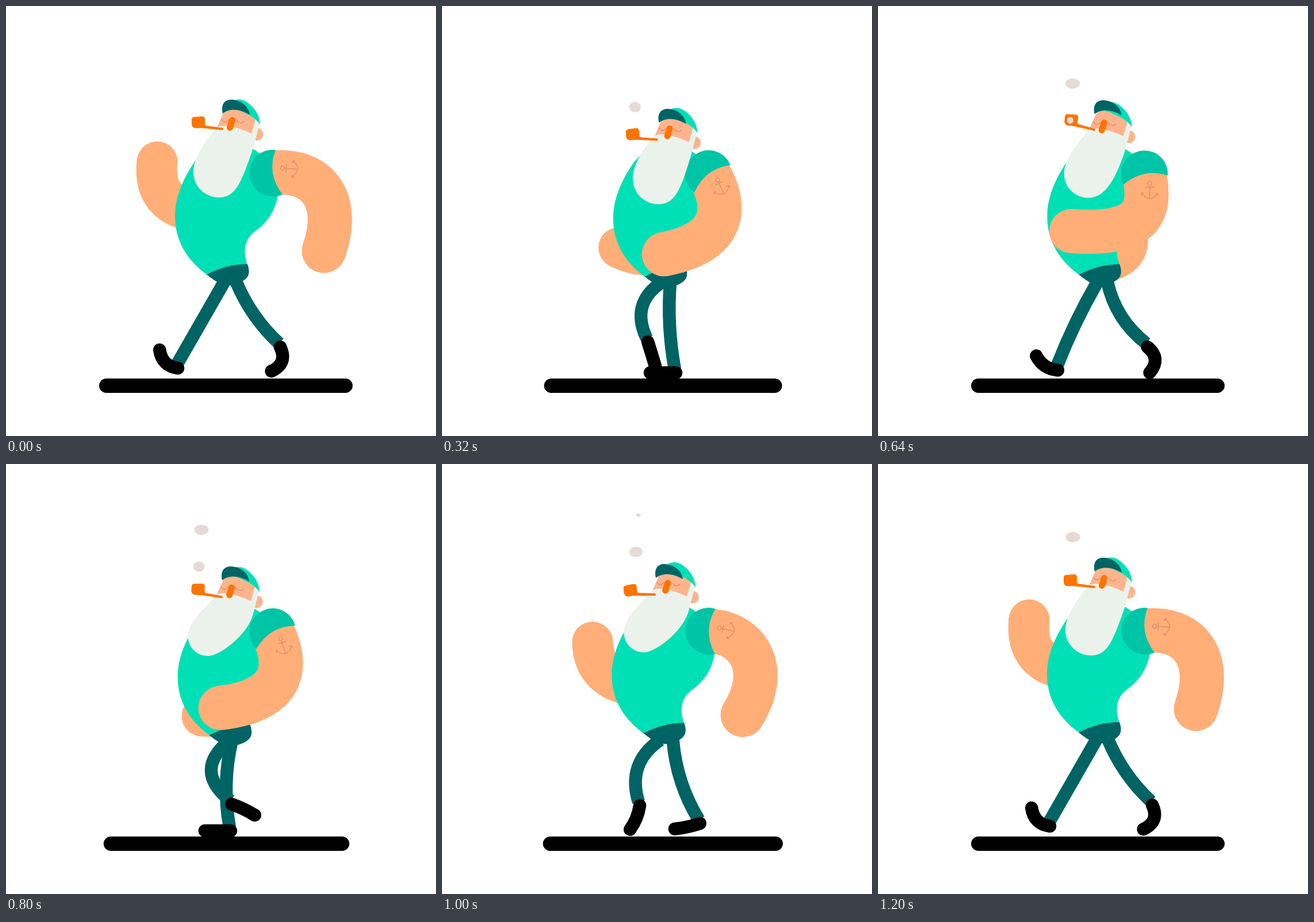
Recreate the animation shown at these times as an HTML page with a canvas. Size 748 by 748 pixels, loop 1.24 s.

```html
<!DOCTYPE html>
<html lang="en">
<head>
<meta charset="utf-8">
<title>Walking sailor</title>
<style>
  html, body { margin: 0; width: 100%; height: 100%; overflow: hidden; background: #fff; }
  canvas { display: block; width: 748px; height: 748px; }
</style>
</head>
<body>
<canvas id="stage" width="748" height="748"></canvas>
<script>
const ctx = document.getElementById('stage').getContext('2d');
const { sin, cos, abs, min, max, floor, hypot, PI } = Math;
const LOOP = 1240, WALK = 1200, STEP = 40;
const SKIN = '#ffae78', FACE = '#fdb48d', SHIRT = '#00e0b6', SLEEVE = '#00c4a6',
      DARK = '#006464', WHITE = '#ebf2eb', ORANGE = '#ff7300', INK = '#d88f6c', SMOKE = '#e5dad8';

const wrap = t => (t + WALK) % WALK;
const rad = deg => deg * PI / 180;

// One walk cycle of a foot: time, heel x, heel y, foot angle, knee bend.
const GAIT = [
  [0, 299, 630, 225, 0],
  [160, 368, 638, 180, 25],
  [320, 407, 638, 180, 10],
  [480, 456, 621, 163, 18],
  [600, 477, 593, 110, 14],
  [760, 406, 593, 20, 70],
  [920, 358, 584, 73, 44],
  [1000, 344, 594, 112, 42],
  [1080, 313, 619, 206, 9]
];

// Arm poses swung back, halfway and forward: start, two controls, hand.
const NEAR_ARM = [
  [463, 290, 536, 282, 586, 332, 553, 426],
  [463, 291, 490, 340, 500, 410, 379, 428],
  [463, 292, 475, 355, 465, 400, 335, 390]
];
const FAR_ARM = [
  [340, 356, 282, 356, 257, 322, 263, 271],
  [385, 425, 360, 438, 335, 434, 307, 420],
  [425, 365, 448, 420, 432, 440, 386, 447]
];

// Smooth periodic curve through the gait rows, without overshoot.
function gait(t) {
  const n = GAIT.length;
  const row = i => GAIT[(i + n) % n];
  const time = i => row(i)[0] + floor(i / n) * WALK;
  const slope = (i, k) => (row(i + 1)[k] - row(i)[k]) / (time(i + 1) - time(i));
  const tangent = (i, k) => {
    const a = slope(i - 1, k), b = slope(i, k);
    return a * b <= 0 ? 0 : 2 * a * b / (a + b);
  };
  let i = n - 1;
  while (GAIT[i][0] > t) i--;
  const h = time(i + 1) - time(i), u = (t - time(i)) / h, v = 1 - u;
  return [1, 2, 3, 4].map(k =>
    row(i)[k] * v * v * (1 + 2 * u) + row(i + 1)[k] * u * u * (3 - 2 * u)
    + h * u * v * (tangent(i, k) * v - tangent(i + 1, k) * u));
}

// Arm swing from 0 (back) to 1 (forward at the peak time).
function swing(t, peak) {
  const u = t < peak ? t / peak : (WALK - t) / (WALK - peak);
  const a = u ** 2.6;
  return a / (a + (1 - u) ** 2.6);
}

// Parabola through three poses at 0, mid and 1.
function blend([a, b, c], mid, w) {
  const ka = (w - mid) * (w - 1) / mid;
  const kb = w * (1 - w) / (mid * (1 - mid));
  const kc = w * (w - mid) / (1 - mid);
  return a.map((v, i) => v * ka + b[i] * kb + c[i] * kc);
}

// Dip after each of the two steps, 0 to 1.
const dip = t => max(0, sin(PI * (wrap(t) % 600) / 480));

function fill(d, color) {
  ctx.fillStyle = color;
  ctx.fill(new Path2D(d));
}
function line(d, color, width, cap = 'round') {
  ctx.strokeStyle = color;
  ctx.lineWidth = width;
  ctx.lineCap = cap;
  ctx.stroke(new Path2D(d));
}
function ellipse(x, y, rx, ry, color) {
  ctx.fillStyle = color;
  ctx.beginPath();
  ctx.ellipse(x, y, rx, ry, 0, 0, 2 * PI);
  ctx.fill();
}
function at(x, y, angle, draw) {
  ctx.save();
  ctx.translate(x, y);
  ctx.rotate(rad(angle));
  draw();
  ctx.restore();
}
// Quadratic curve whose control lies off the chord's middle.
function bow(x, y, x2, y2, bulge) {
  const dx = x2 - x, dy = y2 - y, k = bulge / hypot(dx, dy);
  return `M${x},${y} Q${(x + x2) / 2 + dy * k},${(y + y2) / 2 - dx * k} ${x2},${y2}`;
}

function drawGround(t) {
  const grow = 1 - abs(1 - t % 640 / 320);
  line(`M${174.5 + 15.5 * grow},660.5 H${590.5 - 11.5 * grow}`, '#000', 25);
}

function drawLeg(p) {
  const [x, y, angle, bend] = gait(p);
  const turn = 2 * PI * p / WALK, a = rad(angle);
  const hip = 390 + 12 * sin(turn - PI / 3);
  const curl = 24 * cos(turn) ** 2 * abs(sin(a));
  line(bow(hip, 480, x - 2, y - 6, -bend), DARK, 22.5, 'butt');
  line(bow(x, y, x + 45 * cos(a), y + 45 * sin(a), curl), '#000', 22.5);
}

function drawArm(p, width) {
  line(`M${p[0]},${p[1]} C${p.slice(2)}`, SKIN, width, 'butt');
  ellipse(p[6], p[7], width / 2, width / 2, SKIN);
}

function drawTorso() {
  fill('M349,467 C312,440 294,405 294,366 C294,325 315,290 330,268 L380,215 L427,247 ' +
    'C455,262 475,290 474,322 C470,360 450,380 432,393 C414,407 412,428 420,450 Q383,449 349,467Z', SHIRT);
  fill('M349,467 Q383,449 420,449 C426,466 421,474 409,480 Q390,489 375,484 Q362,478 349,467Z', DARK);
}

function drawSleeve() {
  fill('M6,-40.6 Q-10,0 18,37 A41,41 0 0 1 -39.5,0 A40,40 0 0 1 6,-40.6Z', SLEEVE);
  line('M21.5,-9 a3.5,3.5 0 1 1 -7,0 a3.5,3.5 0 1 1 7,0 L45,-7 M25,-15 L24,-2 ' +
    'M36,-21.5 Q54,-8 34,6.5 M35,-18 L36,-21.5 L40,-22 M34,3 L34,6.5 L38,7', INK, 1.3);
}

function drawBeard(hx, hy, lead, back) {
  const r = 44 - 11 * back, cx = 370 + 6 * lead - 22 * back, cy = 289 + .8 * hy - 3 * back;
  const bottom = cy + r, left = cx - r;
  const qx = 408 + 6 * lead + 14 * back, qy = 312 + .8 * hy - 34 * back;
  const p = (x, y) => `${x + hx},${y + hy}`;
  fill(`M${p(434, 197)} L${p(441, 205)} L${p(430, 247)} ` +
    `C${qx},${qy} ${cx + .64 * r},${bottom} ${cx},${bottom} ` +
    `C${cx - .5 * r},${bottom} ${left},${cy + .6 * r} ${left},${cy} ` +
    `C${left},${cy - 26} ${p(348, 234)} ${p(366, 212)} ` +
    `Q${p(370, 208)} ${p(380, 208.5)} Q${p(403, 210)} ${p(427, 222)}Z`, WHITE);
}

function drawHead(t) {
  const sway = sin(2 * PI * t / WALK), lead = max(0, sway), back = max(0, -sway);
  const hy = 17 * dip(t), lag = 17 * dip(t - 30);
  const hx = 3 * lead * dip(t) - back;
  const brim = hx + 1.5 * min(0, hy - lag);

  at(hx, hy, 0, () => {
    ellipse(436.5, 223, 11, 11, FACE);
    fill('M379,184 L366,214 L428,226 L436,198 L420,176 L388,174Z', FACE);
  });
  drawBeard(hx, hy, lead, back);
  at(hx, hy, 0, () => {
    line('M375,197 Q380,206 387,198 M402,199 Q407,207 414,201', INK, 1.4);
    line('M393.5,198.5 L389.5,211.5', ORANGE, 11);
    fill('M385,175 C395,158 412,160 424,171 C436,182 441,192 442,206 L434,197 L424,190 L405,181Z', SHIRT);
  });
  at(brim, lag, 0, () =>
    fill('M377,187 C373,169 382,162 394,163 C412,165 422,176 424,189 C405,178 388,178 377,187Z', DARK));
  at(378 + 1.2 * brim - 3 * lead, 214 + 1.15 * lag, 2.2 * (hy - lag), () =>
    fill('M-55,-16 Q-55,-21 -50,-21 L-37,-22 Q-32,-22 -32,-17 L-32,-9 Q-32,-6 -28,-5.5 L-1,-2 ' +
      'Q1,0 -1,2 L-35,-1.5 Q-40,-2 -48,-1.5 Q-54,-2 -55,-8Z', ORANGE));
}

function drawPuff(age) {
  if (age <= 0 || age >= 970) return;
  const size = min(1, age / 60, (970 - age) / 220);
  ellipse(334 + .0085 * age, 204 - .128 * age, size * min(12.5, 8 + age / 110), size * 9, SMOKE);
}

function draw(time) {
  const t = time % WALK;
  const nearSwing = swing(t, 550), farSwing = swing(t, 575);
  const farPhase = wrap(t + 600);
  ctx.fillStyle = '#fff';
  ctx.fillRect(0, 0, 748, 748);

  drawGround(t);
  drawArm(blend(FAR_ARM, .64, farSwing), 71);
  at(5 * dip(t) ** 2, 5 * dip(t) ** 2, 0, drawTorso);
  // The far foot runs ahead while it is on the ground.
  drawLeg(farPhase + 60 * max(0, sin(2 * PI * farPhase / WALK)));
  drawLeg(t);
  drawArm(blend(NEAR_ARM, .74, nearSwing), 77);
  at(463, 291, 88 * nearSwing, drawSleeve);
  drawHead(t);
  drawPuff(time - 100);
  drawPuff(time - 600);
}

const start = performance.now();
function tick() {
  const now = (performance.now() - start) % LOOP;
  draw(floor(now / STEP) * STEP);
  requestAnimationFrame(tick);
}
tick();
</script>
</body>
</html>
```
